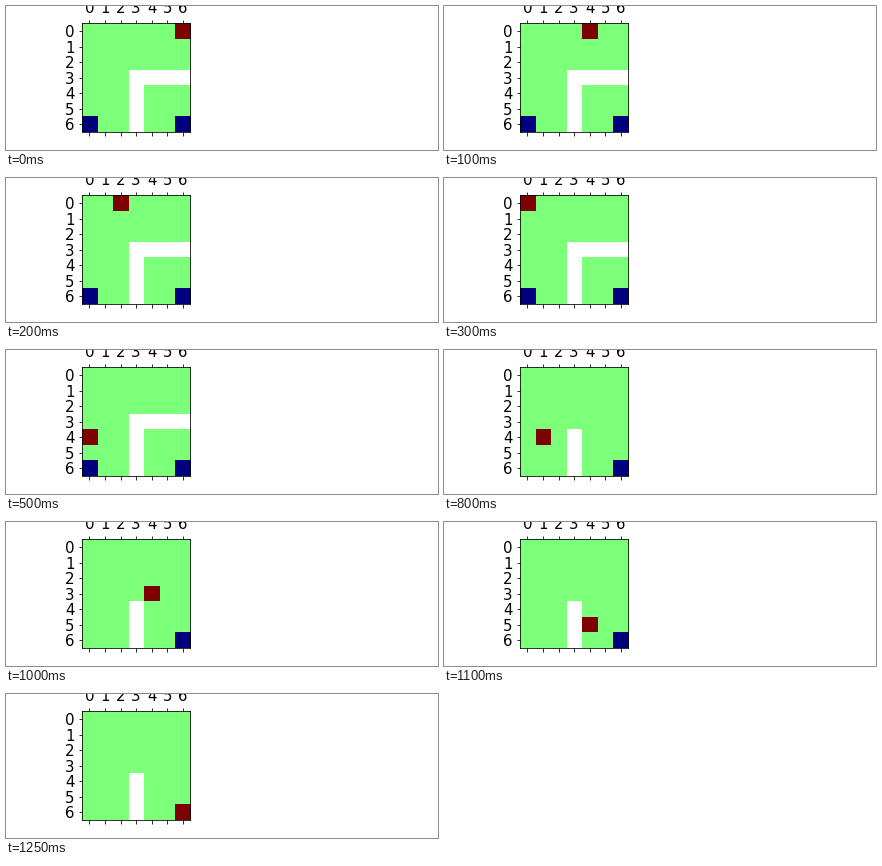
Recreate the animation shown at these times as a matplotlib script. Size 432 px wide and 144 px high, loop 1300 ms.

```python
import matplotlib.pyplot as plt
import numpy as np
from matplotlib.animation import FuncAnimation

plt.rcParams.update({"font.family": "DejaVu Sans", "font.size": 15})

SIZE = 7
START = (0, 6)
KEY = (6, 0)
GOAL = (6, 6)
MOVES = {"L": (0, -1), "R": (0, 1), "U": (-1, 0), "D": (1, 0), ".": (0, 0)}
ROUTE = "LLLLLL" "DDDDDD" "." "URU" "URRR" "DD" "RDR"


def walk(start, route):
    """Cells visited, one per time step."""
    cells = [start]
    for move in route:
        (r, c), (dr, dc) = cells[-1], MOVES[move]
        cells.append((r + dr, c + dc))
    return cells


path = walk(START, ROUTE)
key_step = path.index(KEY)


def grid_at(step):
    grid = np.zeros((SIZE, SIZE))
    grid[3:, 3] = np.nan
    grid[GOAL] = -1
    if step < key_step:
        grid[3, 3:] = np.nan
        grid[KEY] = -1
    else:
        grid[3, 3] = 0  # the door row opens once the key cell is reached
    grid[path[step]] = 1
    return np.ma.masked_invalid(grid)


fig = plt.figure(figsize=(6, 2), dpi=72, facecolor="white")
fig.subplots_adjust(left=0.125, right=0.9, bottom=0.125, top=0.88, wspace=0.2)
ax = fig.add_subplot(1, 2, 1)
image = ax.matshow(grid_at(0), cmap="jet", vmin=-1, vmax=1)
ax.set_xticks(range(SIZE))
ax.set_yticks(range(SIZE))


def update(step):
    image.set_data(grid_at(step))
    return [image]


anim = FuncAnimation(fig, update, frames=len(path), interval=50,
                     repeat=True, repeat_delay=0)
plt.show()
```
